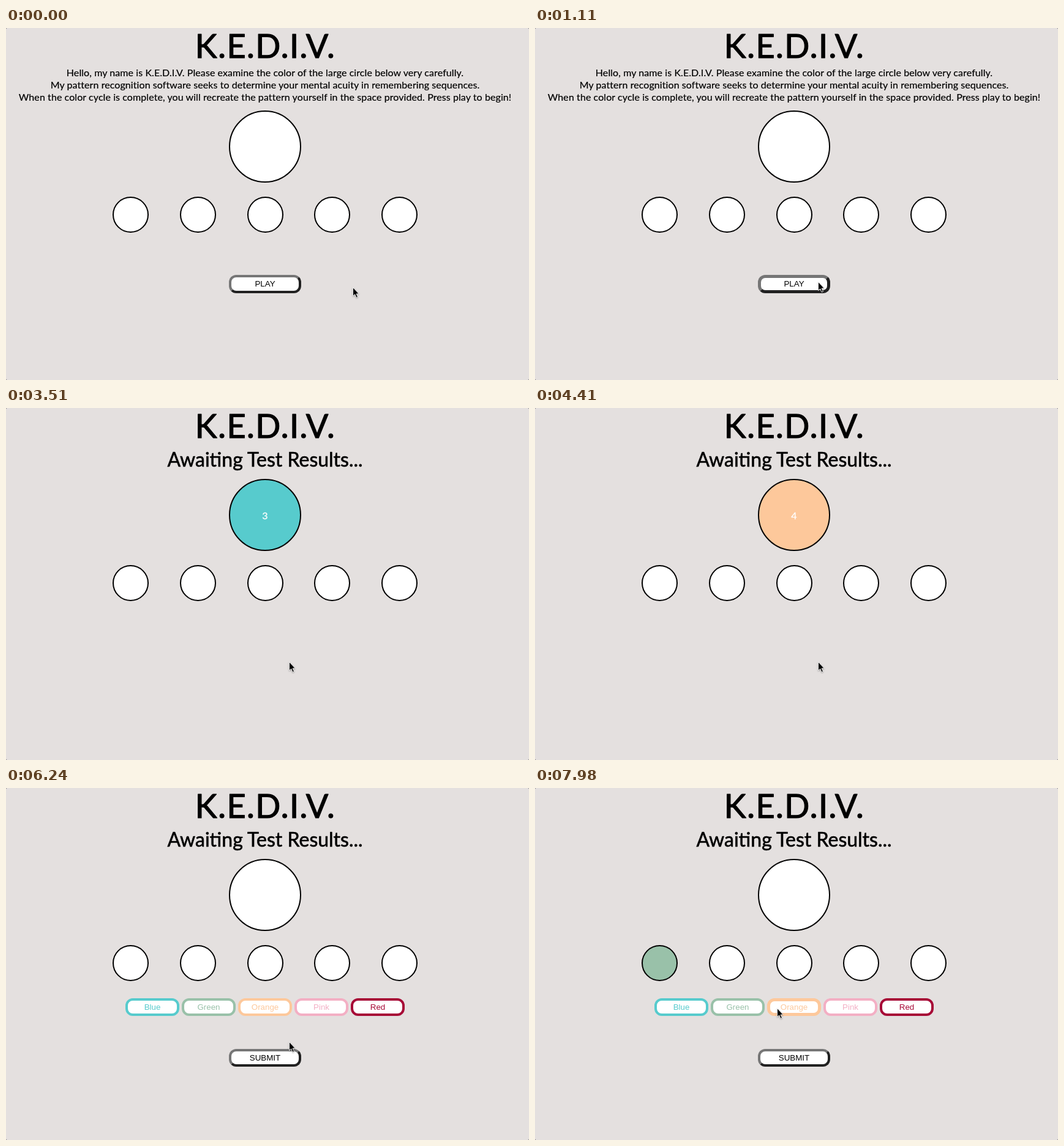
An HTML page that plays this animation: 854 by 576 pixels, repeating every 8 s.

```html
<!DOCTYPE html>
<html lang="en">
<head>
<meta charset="utf-8">
<style>
  html, body { margin: 0; width: 100%; height: 100%; overflow: hidden; background: #666; }
  #stage { position: relative; width: 854px; height: 576px; background: #e4e0df; border-radius: 2px; overflow: hidden; }
  svg { position: absolute; left: 0; top: 0; }
  circle { fill: #fff; stroke: #000; stroke-width: 2; }
  text { font-family: Lato, sans-serif; text-anchor: middle; stroke: #000; stroke-linejoin: round; }
  .title { font-size: 54px; letter-spacing: 1.5px; stroke-width: 1.2px; }
  .status { font-size: 32px; stroke-width: .6px; }
  .intro { font-size: 16px; letter-spacing: .08px; stroke-width: .2px; }
  #count { font-size: 16px; fill: #fff; stroke: #fff; stroke-width: .3px; }
  .button {
    position: absolute; box-sizing: border-box; height: 29px;
    border: 4px solid; border-radius: 12px; background: #fff;
    font: 13.333px/21px "Liberation Sans", Arial, sans-serif; text-align: center;
  }
  .button.hover { border-width: 5px; line-height: 19px; }
  .dark { border-color: #767676 #212121 #212121 #767676; }
</style>
</head>
<body>
<div id="stage">
  <svg id="scene" width="854" height="576">
    <text class="title" x="423.5" y="49">K.E.D.I.V.</text>
    <g id="intro" class="intro">
      <text x="423" y="79">Hello, my name is K.E.D.I.V. Please examine the color of the large circle below very carefully.</text>
      <text x="423" y="99">My pattern recognition software seeks to determine your mental acuity in remembering sequences.</text>
      <text x="423" y="119">When the color cycle is complete, you will recreate the pattern yourself in the space provided. Press play to begin!</text>
    </g>
    <text id="status" class="status" x="423" y="96">Awaiting Test Results...</text>
    <g id="board">
      <circle id="lamp" cx="423" cy="175" r="58"/>
      <text id="count" x="423" y="182"></text>
    </g>
  </svg>
  <svg width="854" height="576" style="z-index:1">
    <path id="cursor" d="M0 0V14.2L3.2 11.3 5.6 16.8 8 15.7 5.6 10.5H9.8Z"
      stroke="#fff" stroke-width=".9" style="filter:drop-shadow(0 1px 1px #0005)"/>
  </svg>
</div>
<script>
const $ = id => document.getElementById(id);
const colors = { Blue: '#57cbcd', Green: '#99c1a9', Orange: '#fdc89b', Pink: '#f3afc4', Red: '#a70a37' };
const sequence = ['Pink', 'Green', 'Blue', 'Orange', 'Blue'];
const LOOP = 8000, START = 1710, STEP = 900, ANSWER = 6210, PICK = 7650;

// time, x, y of the pointer tip
const path = [
  [0, 566, 424], [810, 481, 412], [1110, 462, 415], [6780, 462, 415], [7260, 368, 375],
  [7410, 355, 342], [7560, 367, 367], [7830, 367, 367], [7980, 395, 360]
];

const slots = [203.5, 313.5, 423.5, 532.5, 642.5].map(x => {
  const c = document.createElementNS('http://www.w3.org/2000/svg', 'circle');
  c.setAttribute('cx', x);
  c.setAttribute('cy', 286.5);
  c.setAttribute('r', 28.5);
  return $('board').appendChild(c);
});

function addButton(label, x, y, w, color) {
  const el = document.createElement('div');
  el.className = color ? 'button' : 'button dark';
  el.textContent = label;
  el.style.cssText = `left:${x}px;top:${y}px;width:${w}px;color:${color || '#000'}`;
  $('stage').append(el);
  return { el, x, y, w, h: 29 };
}

const play = addButton('PLAY', 364, 404, 118);
play.el.style.height = '30px';
play.el.style.lineHeight = '22px';
const answers = Object.entries(colors).map(([name, c], i) => addButton(name, 195 + 92 * i, 344, 88, c));
answers.push(addButton('SUBMIT', 364, 427, 118));

const show = (el, on) => { el.style.display = on ? '' : 'none'; };

function pointer(t) {
  const i = path.findIndex(p => p[0] > t);
  if (i < 0) return path[path.length - 1].slice(1);
  const [t0, x0, y0] = path[i - 1], [t1, x1, y1] = path[i];
  const k = (t - t0) / (t1 - t0);
  return [x0 + (x1 - x0) * k, y0 + (y1 - y0) * k];
}

function draw(now) {
  const t = now % LOOP;
  const started = t >= START;
  const turn = Math.floor((t - START) / STEP);
  const lit = sequence[turn];
  const [x, y] = pointer(t).map(Math.round);

  show($('intro'), !started);
  show($('status'), started);
  show(play.el, !started);
  $('board').setAttribute('transform', `translate(0 ${started ? 0 : 19})`);
  $('lamp').style.fill = lit ? colors[lit] : '#fff';
  $('count').textContent = lit ? turn + 1 : '';
  slots[0].style.fill = t >= PICK ? colors.Green : '#fff';

  for (const b of answers) show(b.el, t >= ANSWER);
  for (const b of [play, ...answers])
    b.el.classList.toggle('hover', x >= b.x && x < b.x + b.w && y >= b.y && y < b.y + b.h);
  play.el.style.lineHeight = play.el.classList.contains('hover') ? '20px' : '22px';

  $('cursor').setAttribute('transform', `translate(${x + .5} ${y + .5})`);
  requestAnimationFrame(draw);
}
requestAnimationFrame(draw);
</script>
</body>
</html>
```
